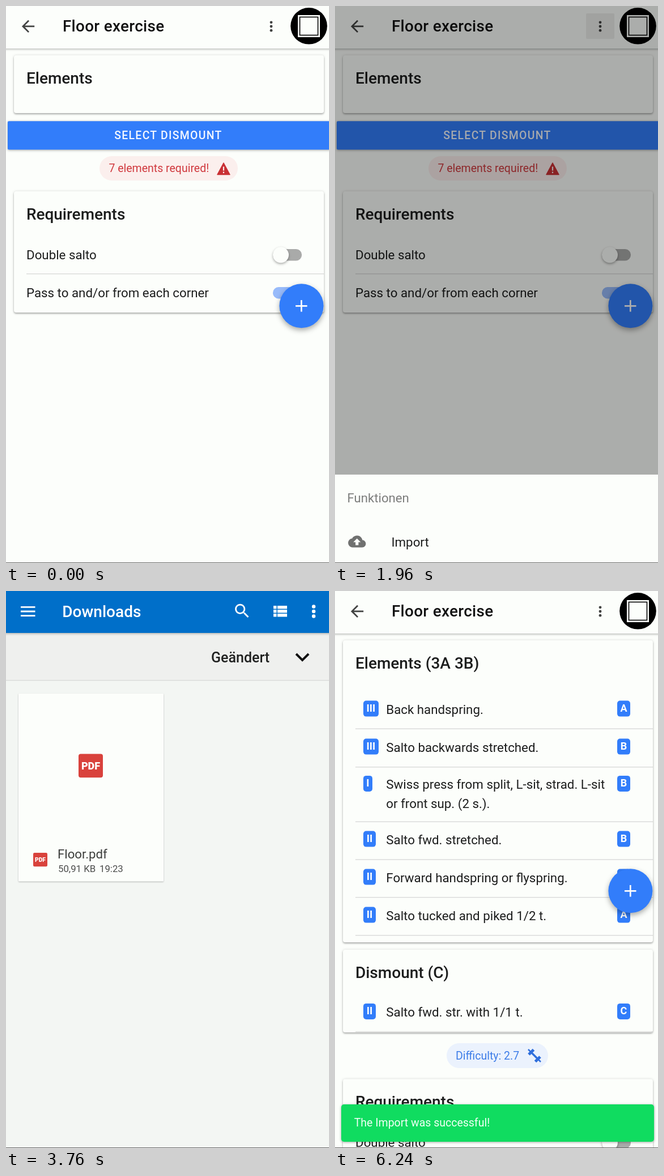
An HTML page for the animation above (6.32 s loop, 570 by 983 pixels).

```html
<!DOCTYPE html>
<html lang="en">
<head>
<meta charset="utf-8">
<style>
html, body { margin: 0; height: 100%; overflow: hidden; background: #fcfefb; }
svg { display: block; width: 570px; height: 983px; font-family: Roboto, sans-serif; }
text { white-space: pre; }
.card { fill: #fcfefb; filter: drop-shadow(0 2px 1.4px #0004) drop-shadow(0 0 2px #0002); }
.bar { filter: drop-shadow(0 1px 2px #0005); }
.fab { filter: drop-shadow(0 4px 5px #0005); }
.knob { filter: drop-shadow(0 2px 2px #0005); }
.thin { filter: drop-shadow(0 1px 1px #0004); }
</style>
</head>
<body>
<svg viewBox="0 0 570 983">
  <defs>
    <clipPath id="press"><rect x="443" y="13" width="50" height="45" rx="2"/></clipPath>
    <clipPath id="reveal"><rect id="window" width="570" height="983"/></clipPath>
  </defs>
  <rect width="570" height="983" fill="#fcfefb"/>
  <g id="app">
    <g id="empty"></g>
    <g id="filled"></g>
    <g id="chrome"></g>
    <g id="toast"></g>
  </g>
  <rect id="dim" width="570" height="983"/>
  <g id="sheet"></g>
  <g clip-path="url(#reveal)"><g id="files"></g></g>
  <rect y="982" width="570" height="1" fill="#666"/>
</svg>
<script>
const $ = id => document.getElementById(id);
const BLUE = '#327dfa', INK = '#1c1d1d', WHITE = '#fcfefb';

// Drawing helpers
const text = (x, y, s, size = 22.3, fill = INK, weight = 400, gap = 0) =>
  `<text x="${x}" y="${y}" font-size="${size}" fill="${fill}" font-weight="${weight}" letter-spacing="${gap}">${s}</text>`;
const box = (x, y, w, h, fill, r = 0, cls = '') =>
  `<rect x="${x}" y="${y}" width="${w}" height="${h}" rx="${r}" fill="${fill}" class="${cls}"/>`;
const dot = (x, y, r, fill, cls = '') => `<circle cx="${x}" cy="${y}" r="${r}" fill="${fill}" class="${cls}"/>`;
const line = (d, color, w) => `<path d="${d}" fill="none" stroke="${color}" stroke-width="${w}"/>`;
const icon = (x, y, scale, fill, d) =>
  `<path transform="translate(${x} ${y}) scale(${scale})" fill="${fill}" d="${d}"/>`;
const card = (y, h) => `<rect class="card" x="14" y="${y}" width="547" height="${h}" rx="4"/>`;
const heading = (y, s) => text(35.9, y, s, 28, INK, 500);
const divider = y => box(36, y, 525, 1.4, '#d9dad9');
const dots = (x, gap, r, fill) => [-gap, 0, gap].map(d => dot(x, 36 + d, r, fill)).join('');

function badge(x, y, s) {
  const w = { I: 16, II: 22, III: 27 }[s] || 23;
  return box(x, y, w, 28, BLUE, 5) +
    `<text x="${x + w / 2}" y="${y + 19.5}" font-size="18" font-weight="700" fill="#fff" text-anchor="middle">${s}</text>`;
}

const row = ([y, group, grade, first, second]) =>
  badge(50, y - 23.4, group) + badge(498, y - 23.4, grade) +
  text(90.3, y, first) + (second ? text(90.3, y + 33.5, second) : '');

const requirements = top => `<g transform="translate(0 ${top})">` +
  card(327, 214) + heading(377, 'Requirements') +
  text(36, 447, 'Double salto') + divider(472) +
  text(36, 513.7, 'Pass to and/or from each corner') +
  box(471, 429, 51, 20.5, '#a9aaa9', 10) + dot(485, 439.3, 14, WHITE, 'knob') +
  box(471, 496, 51, 20.5, '#98bbfa', 10) + '</g>';

const pdf = (x, y, size, font) => box(x, y, size, size * .97, '#d9423c', size / 11) +
  `<text x="${x + size / 2}" y="${y + size * .63}" font-size="${font}" font-weight="900" fill="#fff" text-anchor="middle">PDF</text>`;

$('empty').innerHTML =
  card(87, 102) + heading(137, 'Elements') +
  box(3, 203.3, 570, 50.2, BLUE, 2, 'bar') +
  text(191.3, 234.8, 'SELECT DISMOUNT', 19.4, '#f4f8ff', 500, 1.3) +
  box(165, 265, 244, 43, '#fbefed', 21.5) +
  text(181.4, 293, '7 elements required!', 19.5, '#d0393e') +
  '<path d="M384 277L395 297.500H373Z" fill="#c93034" stroke="#c93034" stroke-width="1.500" stroke-linejoin="round"/>' +
  line('M384 283.500V290.500M384 292.500V295', '#fbefed', 2.2) +
  requirements(0);

const rows = [
  [217, 'III', 'A', 'Back handspring.'],
  [284, 'III', 'B', 'Salto backwards stretched.'],
  [349.3, 'I', 'B', 'Swiss press from split, L-sit, strad. L-sit', 'or front sup. (2 s.).'],
  [447, 'II', 'B', 'Salto fwd. stretched.'],
  [514, 'II', 'A', 'Forward handspring or flyspring.'],
  [581, 'II', 'A', 'Salto tucked and piked 1/2 t.']
];
$('filled').innerHTML =
  card(87, 533) + heading(137, 'Elements (3A 3B)') + rows.map(row).join('') +
  [242.5, 310, 406.5, 473.3, 540, 607].map(divider).join('') +
  card(633, 146) + heading(683, 'Dismount (C)') +
  row([751.3, 'II', 'C', 'Salto fwd. str. with 1/1 t.']) + divider(777) +
  box(197, 798, 179, 44, '#ebf2fd', 22) +
  text(213, 826.5, 'Difficulty: 2.7', 19.5, '#3d7de8') +
  line('M345 813L359 827', '#2f6fdc', 3.4) +
  line('M342 818L350.500 809.500M353.500 830.500L362 822', '#2f6fdc', 5) +
  line('M341 809L345 813M359 827L363 831', '#2f6fdc', 2.5) +
  requirements(534.3);

$('chrome').innerHTML =
  box(-5, -30, 580, 105, WHITE, 0, 'bar') +
  icon(22.4, 19.3, 1.39, '#424342', 'M20 11H7.83l5.59-5.59L12 4l-8 8 8 8 1.41-1.41L7.83 13H20v-2z') +
  text(99.9, 45.4, 'Floor exercise', 27.8, '#111', 500, .35) +
  '<g id="pressed" clip-path="url(#press)">' + box(443, 13, 50, 45, '#0000000f') +
  '<circle id="ripple" cx="468" cy="30"/></g>' +
  dots(468, 7.2, 2.4, '#424342') +
  dot(534.5, 35.3, 32.3, '#000') + box(515, 16, 39, 39, WHITE) +
  '<rect x="518.500" y="19.500" width="32" height="32" fill="none" stroke="#000" stroke-width="1.600"/>' +
  dot(521.4, 529.2, 39, BLUE, 'fab') +
  line('M511 529.300H531.500M521.300 519V539.500', '#fff', 2.7);

$('toast').innerHTML = box(11, 906, 552, 66, '#10dc60', 5, 'bar') +
  text(33.7, 945, 'The Import was successful!', 19.5, '#f2fff6');

$('sheet').innerHTML = box(0, 827, 570, 156, WHITE) +
  text(21.5, 875.5, 'Funktionen', 22.2, '#7c7d7c') + text(99.5, 954.3, 'Import') +
  icon(23.2, 929.4, 1.3, '#707170', 'M19.35 10.04C18.67 6.59 15.64 4 12 4 9.11 4 6.6 5.64 5.35 8.04 2.34 8.36 0 10.91 0 14c0 3.31 2.69 6 6 6h13c2.76 0 5-2.24 5-5 0-2.64-2.05-4.78-4.65-4.96zM14 13v4h-4v-4H7l5-5 5 5h-3z');

$('files').innerHTML = box(0, 0, 570, 1030, '#f3f6f3') +
  box(0, 74, 570, 84, '#eff0ee') + box(0, 157, 570, 1.4, '#d9dad9') +
  box(-5, -5, 580, 79, '#006fc9', 0, 'bar') +
  line('M26 28.300H51.500M26 36H51.500M26 43.700H51.500', '#fff', 2.8) +
  text(99.3, 46, 'Downloads', 28, '#fff', 500) +
  icon(400, 18.5, 1.39, '#fff', 'M15.5 14h-.79l-.28-.27C15.41 12.59 16 11.11 16 9.5 16 5.91 13.09 3 9.5 3S3 5.91 3 9.5 5.91 16 9.5 16c1.61 0 3.09-.59 4.23-1.57l.27.28v.79l5 4.99L20.49 19l-4.99-5zm-6 0C7.01 14 5 11.99 5 9.5S7.01 5 9.5 5 14 7.01 14 9.5 11.99 14 9.5 14z') +
  [26, 33, 40].map(y => box(472, y, 5.5, 5.5, '#fff') + box(479, y, 17, 5.5, '#fff')).join('') +
  dots(543, 8.5, 3.2, '#fff') +
  text(362, 126, 'Geändert', 25, '#212221', 500) +
  line('M512 111L523 122L534 111', '#111', 4) +
  box(22, 181, 256, 331.5, WHITE, 1, 'thin') +
  pdf(128, 287.5, 43, 18) + pdf(48, 462, 25, 10.3) +
  text(91, 472, 'Floor.pdf', 22.2, '#3c3d3c') +
  text(92, 496, '50,91 KB', 16.8, '#4c4d4c') + text(165, 496, '19:23', 16.8, '#4c4d4c');

// Timing
const LOOP = 6320, OPEN = 2860, CLOSE = 4180, SLIDE = 425;
const span = (t, start, length) => Math.min(1, Math.max(0, (t - start) / length));
const cubic = (a, b, s) => 3 * s * (1 - s) ** 2 * a + 3 * s * s * (1 - s) * b + s ** 3;
function bezier(x, x1, y1, x2, y2) {
  let lo = 0, hi = 1;
  for (let i = 0; i < 24; i++) {
    const mid = (lo + hi) / 2;
    if (cubic(x1, x2, mid) < x) lo = mid; else hi = mid;
  }
  return cubic(y1, y2, hi);
}
const snap = x => bezier(x, .36, .66, .04, 1);
const smooth = x => bezier(x, .4, 0, .2, 1);
const rush = x => 1 - (1 - x) ** 5.3;
const show = (id, on) => $(id).setAttribute('display', on ? 'inline' : 'none');
const shift = (id, y) => $(id).setAttribute('transform', `translate(0 ${y})`);

function draw(t) {
  const opened = span(t, OPEN, SLIDE), closed = span(t, CLOSE, SLIDE);
  const up = snap(span(t, 1081, 400)) - snap(span(t, 2500, 450));
  const away = smooth(opened) - smooth(closed);
  const done = t > 3500;

  show('empty', !done);
  show('filled', done);
  shift('app', -19.7 * away);
  $('dim').setAttribute('opacity', 1 - (1 - .32 * up) * (1 - .1 * (opened - closed)));
  shift('sheet', 983 * (1 - up));

  show('pressed', t >= 1040 && t < 2500);
  $('ripple').setAttribute('r', 10 + 17 * span(t, 1040, 80) + 14 * span(t, 1120, 150));
  $('ripple').setAttribute('opacity', .09 * (1 - span(t, 1250, 300)));

  show('files', t >= OPEN && closed < 1);
  $('window').setAttribute('y', 983 * (1 - rush(opened) + rush(closed)));
  shift('files', 40 * (1 - away));

  $('toast').setAttribute('opacity', snap(span(t, 4300, 400)));
}

function tick(now) {
  draw(now % LOOP);
  requestAnimationFrame(tick);
}
draw(0);
requestAnimationFrame(tick);
</script>
</body>
</html>
```
